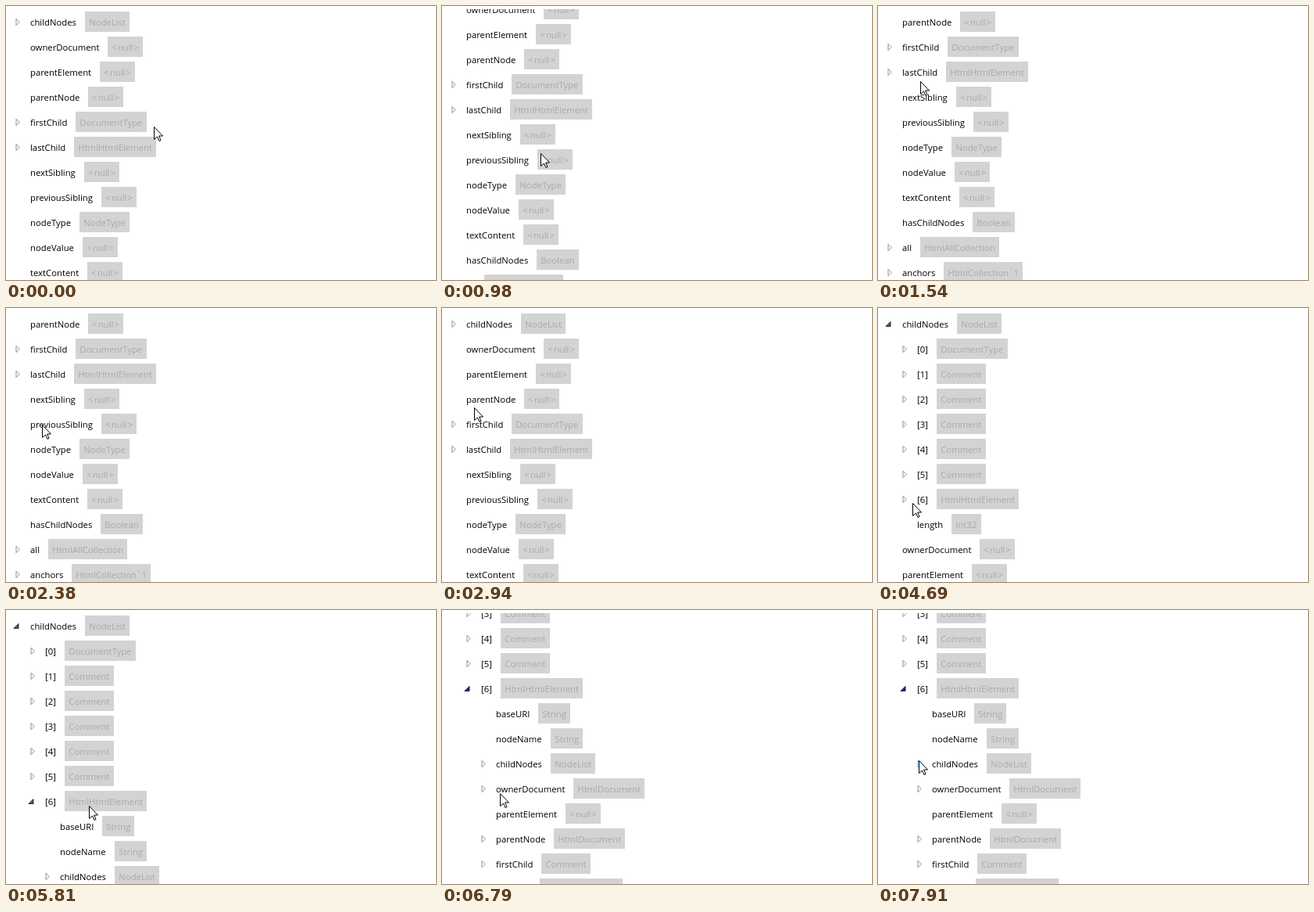
An HTML page with a canvas for the animation above (8000 ms loop, 550x350 px).

```html
<!DOCTYPE html>
<html lang="en">
<head>
<meta charset="utf-8">
<title>DOM tree inspector</title>
<style>
html, body { margin: 0; height: 100%; overflow: hidden; background: #fff; }
canvas { display: block; }
</style>
</head>
<body>
<canvas id="stage" width="550" height="350"></canvas>
<script>
const ctx = document.getElementById('stage').getContext('2d');
const LOOP = 8000, TICK = 70, ROW = 32, INDENT = 19, GAP = 11, PAD = 5.3;
const NULL = '<\u200anull\u200a>';

// "+" marks a row that can be expanded, "-" a null value
const parse = (level, text) => text.trim().split(/\s*\n\s*/).map(line => {
  const [name, value] = line.split(' ');
  return {
    level,
    label: name.replace('+', ''),
    value: value === '-' ? NULL : value,
    expandable: name[0] === '+'
  };
});

const root = parse(0, `
  +childNodes NodeList
  ownerDocument -
  parentElement -
  parentNode -
  +firstChild DocumentType
  +lastChild HtmlHtmlElement
  nextSibling -
  previousSibling -
  nodeType NodeType
  nodeValue -
  textContent -
  hasChildNodes Boolean
  +all HtmlAllCollection
  +anchors HtmlCollection\`1`);
const nodes = parse(1, `
  +[0] DocumentType
  +[1] Comment
  +[2] Comment
  +[3] Comment
  +[4] Comment
  +[5] Comment
  +[6] HtmlHtmlElement
  length Int32`);
const element = parse(2, `
  baseURI String
  nodeName String
  +childNodes NodeList
  +ownerDocument HtmlDocument
  parentElement -
  +parentNode HtmlDocument
  +firstChild Comment
  +lastChild HtmlBodyElement`);

const OPEN_LIST = 3570, OPEN_ELEMENT = 5320;
const wheelDown = [70, 1050, 5880, 5950, 6020], wheelUp = [2520, 2590];
const pointerStart = [189, 154];
const pointerMoves = [
  { from: 490, to: 980, x: 126, y: 188 },
  { from: 1120, to: 1960, x: 14, y: 45 },
  { from: 1960, to: 2380, x: 46, y: 149 },
  { from: 2870, to: 3500, x: 17, y: 15 },
  { from: 3780, to: 4620, x: 48, y: 253 },
  { from: 4620, to: 4900, x: 37, y: 242 },
  { from: 5460, to: 5810, x: 106, y: 250 },
  { from: 6510, to: 7070, x: 56, y: 225 },
  { from: 7420, to: 7910, x: 52, y: 192 }
];

const clamp = k => Math.min(1, Math.max(0, k));
const easeOut = k => 1 - (1 - k) ** 1.5;

function pointerAt(t) {
  let [x, y] = pointerStart;
  for (const move of pointerMoves) {
    const k = easeOut(clamp((t - move.from) / (move.to - move.from)));
    x += (move.x - x) * k;
    y += (move.y - y) * k;
  }
  return [Math.round(x), Math.round(y)];
}

function scrollAt(t) {
  const turns = times => times.filter(time => time <= t).length;
  return 48 * (turns(wheelDown) - turns(wheelUp));
}

function visibleRows(t) {
  const [first, ...rest] = root;
  if (t < OPEN_LIST) return root;
  const list = { ...first, open: true };
  if (t < OPEN_ELEMENT) return [list, ...nodes, ...rest];
  return [list, ...nodes.slice(0, 6), { ...nodes[6], open: true }, ...element, nodes[7], ...rest];
}

function polygon(points, fill, stroke) {
  ctx.beginPath();
  points.forEach(([x, y]) => ctx.lineTo(x, y));
  ctx.closePath();
  ctx.fillStyle = fill;
  ctx.strokeStyle = stroke;
  ctx.fill();
  ctx.stroke();
}

function drawArrow(x, y, open, hover, scrolled) {
  if (open) {
    const [fill, stroke] = hover ? ['#82dffb', '#1cc4f7']
      : scrolled ? ['#3a1a78', '#24104e'] : ['#595959', '#262626'];
    polygon([[x + 3, y - 3], [x + 3, y + 3], [x - 3, y + 3]], fill, stroke);
  } else {
    polygon([[x, y - 4.2], [x + 4.2, y], [x, y + 4.2]], '#fff', hover ? '#1bbbfa' : '#919191');
  }
}

function drawRow(row, top, [px, py], scrolled) {
  const x = 31 + INDENT * row.level, baseline = top + 25;
  const width = text => ctx.measureText(text).width;
  const boxX = Math.round(x + width(row.label) + GAP);
  ctx.fillStyle = '#d3d3d3';
  ctx.fillRect(boxX, top + 7, Math.round(width(row.value) + 2 * PAD), 26);
  ctx.fillStyle = '#a9a9a9';
  ctx.fillText(row.value, boxX + PAD, baseline);
  ctx.fillStyle = '#000';
  ctx.fillText(row.label, x, baseline);
  if (row.expandable) {
    const arrowX = x - 18, arrowY = top + 20.5;
    const hover = Math.abs(px - arrowX) < 8 && Math.abs(py - arrowY) < 8;
    drawArrow(arrowX, arrowY, row.open, hover, scrolled);
  }
}

function drawPointer([x, y]) {
  const shape = [[0, 0], [0, 16], [4, 12.5], [6.5, 18], [8.5, 17], [6.2, 11.5], [11, 11.5]];
  polygon(shape.map(([dx, dy]) => [x + dx + 0.5, y + dy + 0.5]), '#fff', '#000');
}

function draw(now) {
  const t = Math.floor(now % LOOP / TICK) * TICK;
  const scroll = scrollAt(t), pointer = pointerAt(t);
  ctx.fillStyle = '#fff';
  ctx.fillRect(0, 0, 550, 350);
  ctx.font = '11.3px "Open Sans", sans-serif';
  ctx.save();
  ctx.beginPath();
  ctx.rect(0, 4, 550, 346);
  ctx.clip();
  visibleRows(t).forEach((row, i) => drawRow(row, i * ROW - scroll, pointer, scroll > 0));
  ctx.restore();
  drawPointer(pointer);
}

const start = performance.now();
function tick() {
  draw(performance.now() - start);
  requestAnimationFrame(tick);
}
tick();
</script>
</body>
</html>
```
